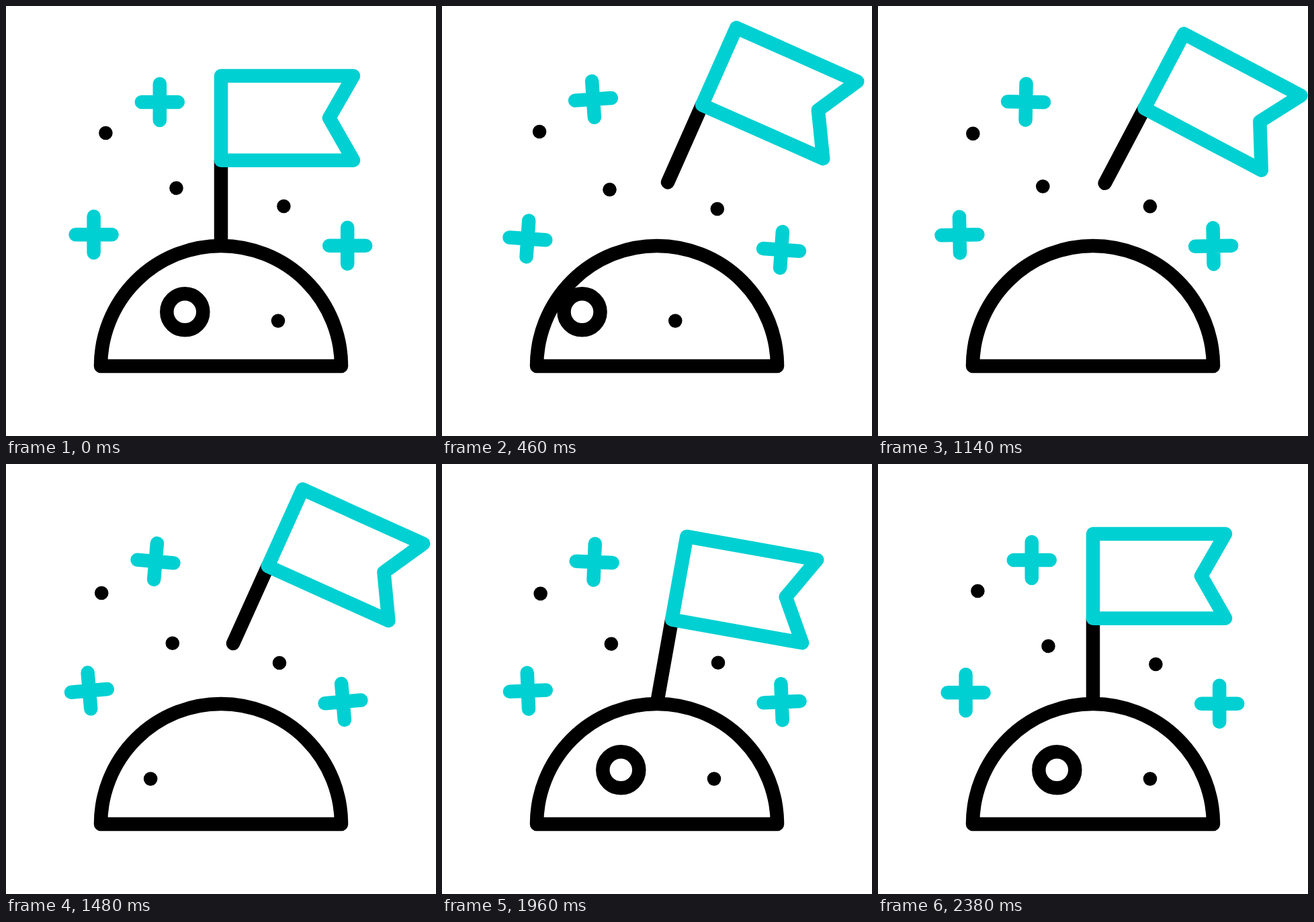
An HTML page that plays this animation: 640x640 px, repeating every 2.4 s.

```html
<!DOCTYPE html>
<html lang="en">
<head>
<meta charset="utf-8">
<title>Flag on a moon</title>
<style>
  html, body { margin: 0; width: 100%; height: 100%; overflow: hidden; background: #fff; }
  svg { display: block; width: 100vw; height: 100vh; }
  .line { fill: none; stroke: #000; stroke-width: 20.5; stroke-linecap: round; stroke-linejoin: round; }
  .teal { stroke: #00d0d2; }
</style>
</head>
<body>
<svg viewBox="0 0 640 640">
  <defs>
    <clipPath id="moon"><path d="M141 536A179 179 0 0 1 499 536Z"/></clipPath>
    <g id="craters">
      <circle class="line" cx="266.3" cy="455.3" r="27"/>
      <circle cx="405" cy="468.6" r="10.3"/>
    </g>
    <path id="plus" class="line teal" d="M-27 0H27M0-27V27"/>
    <circle id="dot" r="10.3"/>
  </defs>
  <g id="sky"></g>
  <g id="flag">
    <path class="line" d="M0 0V-126"/>
    <path class="line teal" d="M0-126V-251.7H197L161-189L197-126Z"/>
  </g>
  <g clip-path="url(#moon)">
    <use id="near" href="#craters"/>
    <use id="far" href="#craters"/>
  </g>
  <path class="line" d="M141 536A179 179 0 0 1 499 536Z"/>
</svg>
<script>
const LOOP = 2400;
const WRAP = 769;
const $ = id => document.getElementById(id);

// Eased steps: [time, value]
const tilt = [[0, 0], [540, 25.4], [1250, 28], [1570, 23.4], [1837, 0], [2020, 13.4], [2380, 0], [LOOP, 0]];
const shift = [[0, 0], [540, 17], [1500, 18], [1590, 17.5], [1837, 0], [LOOP, 0]];
const lift = [[0, 0], [540, -99], [1500, -88.6], [1590, -88], [1837, 0], [LOOP, 0]];
const spin = [[0, 0], [510, -59.3], [1918, WRAP], [LOOP, WRAP]];
const sway = [[0, 0], [660, 5], [1500, -5], [LOOP, 0]];

// Drift curves pass through these offsets at the shared times
const times = [0, 460, 840, 1100, 1480, 1780, 2140, LOOP];
const floaters = [
  { shape: 'plus', x: 228.8, y: 143, turn: -1,
    dx: [-3.8, -7.8, -8.8, -6.3, -3.8, -.8], dy: [-4.2, -2.7, -.6, 2, 3, 2] },
  { shape: 'plus', x: 130.6, y: 340.2, turn: 1,
    dx: [-3.2, -8.2, -9.2, -6.7, -4.2, -1.4], dy: [6.2, 4, 1, -2.8, -3.1, -1.6] },
  { shape: 'plus', x: 508.2, y: 356.7, turn: 1,
    dx: [-3.2, -8.2, -9.2, -6.7, -4.2, -1.3], dy: [6.2, 4, 1, -2.8, -3, -1.6] },
  { shape: 'dot', x: 148.4, y: 189, turn: 0,
    dx: [-3.3, -5.9, -7, -6.2, -3.6, -.3], dy: [-2, -1.4, .6, 3, 4.5, 2.5] },
  { shape: 'dot', x: 253.5, y: 271, turn: 0,
    dx: [-4, -7.8, -8.3, -5.7, -3.1, -.5], dy: [2.2, .5, -2.1, -4.2, -4.2, -2] },
  { shape: 'dot', x: 413.4, y: 298, turn: 0,
    dx: [-3.6, -7.5, -8.5, -6.4, -4, -1], dy: [4, 2.8, .5, -2, -2.2, -1.9] }
];

for (const f of floaters) {
  f.el = document.createElementNS('http://www.w3.org/2000/svg', 'use');
  f.el.setAttribute('href', '#' + f.shape);
  $('sky').append(f.el);
  f.dx = [0, ...f.dx, 0];
  f.dy = [0, ...f.dy, 0];
}

function eased(steps, t) {
  const i = Math.max(1, steps.findIndex(s => s[0] > t));
  const [t0, a] = steps[i - 1], [t1, b] = steps[i];
  const u = (t - t0) / (t1 - t0);
  return a + (b - a) * u * u * (3 - 2 * u);
}

function slope(v, i) {
  if (i === 0 || i === v.length - 1) return 0;
  const h = times[i] - times[i - 1], k = times[i + 1] - times[i];
  return ((v[i] - v[i - 1]) / h * k + (v[i + 1] - v[i]) / k * h) / (h + k);
}

function drift(v, t) {
  const j = times.findIndex(s => s > t), i = j - 1;
  const h = times[j] - times[i], u = (t - times[i]) / h, w = 1 - u;
  return v[i] * w * w * (1 + 2 * u) + v[j] * u * u * (3 - 2 * u)
    + h * u * w * (slope(v, i) * w - slope(v, j) * u);
}

function place(el, x, y, angle = 0) {
  el.setAttribute('transform', `translate(${x} ${y}) rotate(${angle})`);
}

function draw(now) {
  const t = now % LOOP;
  place($('flag'), 320 + eased(shift, t), 355.7 + eased(lift, t), eased(tilt, t));
  const roll = eased(spin, t);
  place($('near'), roll, 0);
  place($('far'), roll - WRAP, 0);
  const turn = eased(sway, t);
  for (const f of floaters) {
    place(f.el, f.x + drift(f.dx, t), f.y + drift(f.dy, t), f.turn * turn);
  }
}

const start = performance.now();
function tick(now) {
  draw(Math.max(0, now - start));
  requestAnimationFrame(tick);
}
draw(0);
requestAnimationFrame(tick);
</script>
</body>
</html>
```
